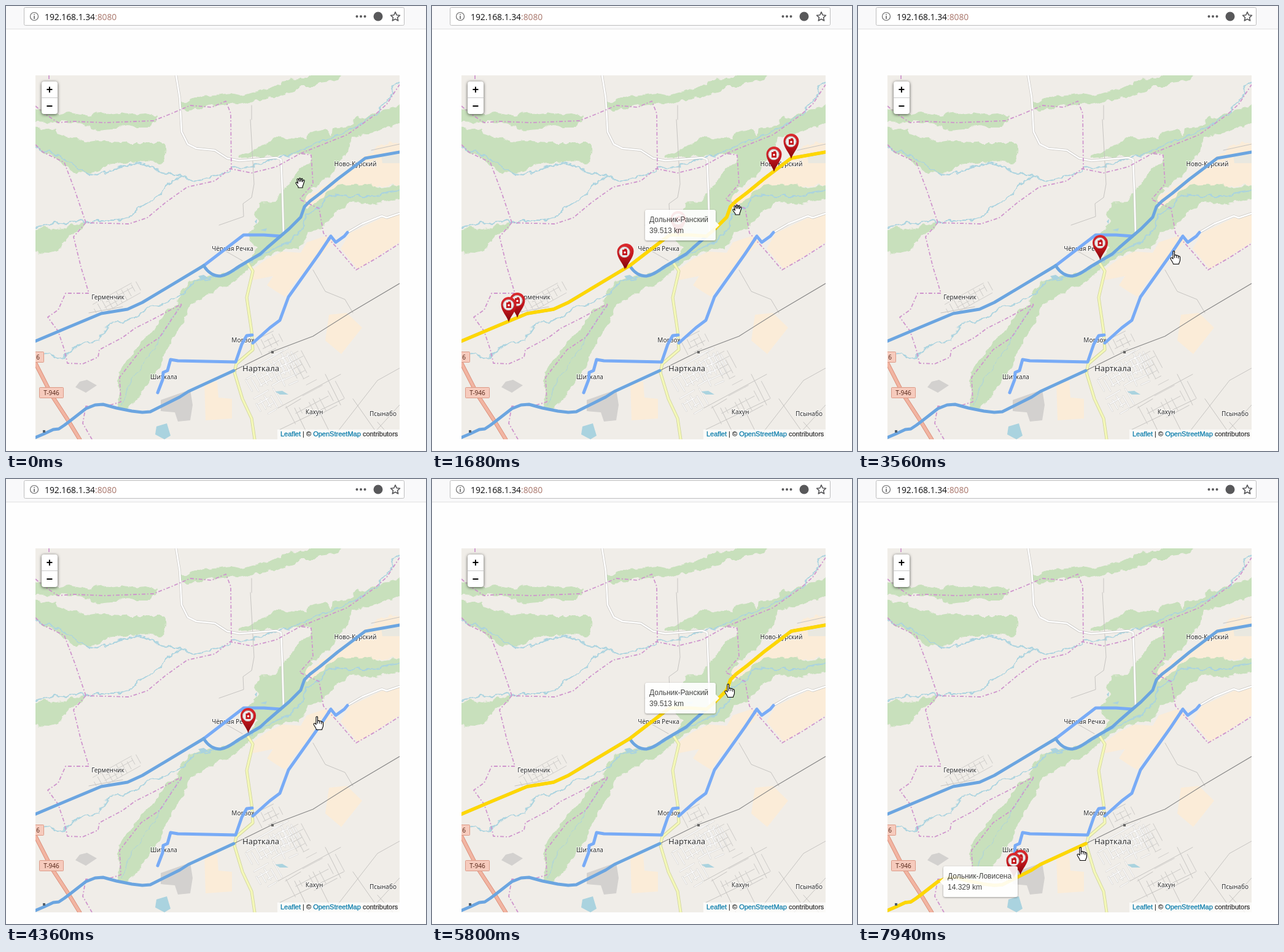
Write an HTML page that moves like this. It is 684 px wide and 725 px high and loops after 8000 ms.

```html
<!DOCTYPE html>
<html lang="ru">
<head>
<meta charset="utf-8">
<title>Road map</title>
<style>
html, body { margin: 0; width: 100%; height: 100%; overflow: hidden; background: #fefefe; }
svg { position: absolute; left: 0; top: 0; will-change: transform; }
path, line { fill: none; stroke-linejoin: round; stroke-linecap: round; }
.wood { fill: #c8e0bc; }
.farm { fill: #fbecd8; }
.town { fill: #d3d1cf; }
.water { fill: #aad3df; }
.river { stroke: #aad3df; stroke-width: 2; }
.border { stroke: #cf95cd; stroke-width: 1.8; stroke-dasharray: 6 3 2 3; stroke-linecap: butt; }
.thin { stroke: #c6c4c1; stroke-width: 1; }
.label { font: 10px "Noto Sans", "Open Sans", sans-serif; fill: #2b2b2b; text-anchor: middle;
  stroke: #fff; stroke-opacity: .7; stroke-width: 2; paint-order: stroke; }
.ref { font: 10px "Noto Sans", sans-serif; fill: #5a2a1c; text-anchor: middle; }
.road { stroke: #78abf6; stroke-width: 5; }
.dark { stroke: #6ba5e0; }
.hot { stroke: #ffd700; stroke-width: 5.5; }
.tip { opacity: .9; font: 12px "Liberation Sans", Arial, sans-serif; fill: #333; }
.tip rect, .tip path { fill: #fff; }
.tip rect { filter: drop-shadow(0 1px 1.5px rgba(0,0,0,.4)); }
.zoom { font: bold 18px "Liberation Mono", monospace; text-anchor: middle; }
.cursor path { fill: #fff; stroke: #000; stroke-width: 1.1; }
</style>
</head>
<body>
<svg width="684" height="725">
  <defs>
    <clipPath id="frame"><rect x="48" y="113" width="593" height="593"/></clipPath>
    <filter id="rough" filterUnits="userSpaceOnUse" x="30" y="100" width="630" height="620" color-interpolation-filters="sRGB">
      <feTurbulence type="fractalNoise" baseFrequency=".09" numOctaves="2" seed="4"/>
      <feDisplacementMap in="SourceGraphic" scale="10" xChannelSelector="R" yChannelSelector="G"/>
    </filter>
  </defs>

  <!-- browser bar -->
  <rect width="684" height="37.5" fill="#f9f9fa"/>
  <path d="M0,37.5H684" stroke="#e0e0e1"/>
  <rect x="29.5" y="2.5" width="619" height="29" rx="2" fill="#fff" stroke="#bdbdbe"/>
  <circle cx="46" cy="17" r="6.5" fill="none" stroke="#6a6a6b" stroke-width="1.2"/>
  <path d="M46,16.5V20.5M46,13.6V13.7" stroke="#6a6a6b" stroke-width="1.7"/>
  <text x="63" y="22.5" font-family="Open Sans, Noto Sans, sans-serif" font-size="13.8" fill="#0c0c0d">192.168.1.34<tspan fill="#a8756a">:8080</tspan></text>
  <g fill="#58585a"><circle cx="571.5" cy="17" r="2"/><circle cx="578" cy="17" r="2"/><circle cx="584.5" cy="17" r="2"/><circle cx="606" cy="17" r="7.5"/></g>
  <path d="M634,9.8 636.2,14.7 641.5,15.2 637.5,18.8 638.7,24 634,21.2 629.3,24 630.5,18.8 626.5,15.2 631.8,14.7Z" stroke="#58585a" stroke-width="1.6"/>

  <!-- base map -->
  <g clip-path="url(#frame)">
    <rect x="48" y="113" width="593" height="593" fill="#f0ede8"/>
    <g filter="url(#rough)">
      <path class="wood" d="M40,162 60,170 75,172 86,178 100,173 117,176 135,180 150,172 165,176 185,174 205,177 225,174 246,180 244,190 235,197 210,197 195,193 180,200 150,203 135,198 120,190 90,188 75,190 40,187Z"/>
      <path class="wood" d="M40,198 80,202 92,212 108,215 130,222 150,219 200,223 258,223 260,240 255,257 230,253 190,256 165,258 150,270 130,273 112,272 95,262 85,250 65,240 40,226Z"/>
      <path class="wood" d="M286,158 320,147 367,142 385,146 405,140 440,130 455,122 475,118 490,118 510,106 552,106 535,122 512,125 500,131 480,131 470,139 435,150 415,152 395,158 380,161 367,158 330,163 310,168 295,171 286,166Z"/>
      <path class="wood" d="M40,365 60,361 85,365 102,359 132,352 125,363 108,370 95,385 85,398 70,402 40,401Z"/>
      <path class="farm" d="M609,226 650,221 650,290 600,293 560,291 525,300 512,322 492,328 478,317 500,305 530,285 570,258Z"/>
      <path class="wood" d="M650,145 632,166 600,172 588,183 572,180 560,196 532,199 530,210 520,200 492,206 490,217 440,214 425,222 403,235 383,241 378,249 445,244 495,240 497,255 478,264 470,278 460,290 452,300 436,320 412,322 406,338 410,352 395,372 398,385 412,395 455,394 475,398 485,385 493,370 512,362 530,345 545,330 560,320 600,323 620,318 650,315 650,290 610,295 585,290 545,292 525,300 510,318 490,330 486,315 500,298 520,283 535,270 545,250 558,238 562,215 600,205 650,188Z"/>
      <path class="wood" d="M412,390 400,410 380,425 352,436 322,442 300,450 282,468 278,487 262,497 250,512 240,530 222,545 212,560 190,585 183,605 187,630 180,655 195,658 205,650 222,630 238,605 250,590 262,560 277,535 290,510 300,487 320,475 345,462 368,452 385,437 400,425 420,410 440,402 455,394Z"/>
      <path class="river" d="M40,228 75,240 90,245 115,262 130,273 150,275 190,262 215,255 235,260 250,270 290,278 310,284 340,277 360,270 370,263 400,262 440,248 480,237 500,225 530,215 555,205 580,190 600,178 610,165 625,150 630,130 650,122"/>
      <path class="river" d="M40,362 62,358 80,353 100,355 120,348 130,353 150,350 180,350 200,345 215,330 240,315 260,297 270,285 285,278"/>
      <path class="river" d="M40,568 62,566 75,567 80,573 95,571 105,560 115,553 130,548 150,545 160,530 170,515 195,513 215,503 235,490 255,487 275,475 290,468 305,450 340,442 370,433 400,415 430,398 460,385 480,365 490,340 510,330 520,312 540,308 560,310 600,310 625,303 650,300"/>
      <path class="river" stroke-opacity=".8" d="M190,650 200,615 222,585 250,545 265,515 285,490" style="stroke-width:1.2"/>
    </g>
    <path class="farm" d="M641,338V385L573,429 545,395 560,370 610,346ZM400,430 425,412 450,400 480,402 490,385 520,375 535,382 500,420 470,450 455,474 440,465 425,455 435,440 400,447ZM526,503 555,500 580,524 546,567 520,545ZM323,613 344,612 346,638 368,640 368,672 325,675Z"/>
    <path d="M611,243 641,237V256L613,256Z" style="fill:#e9e8e0"/>
    <path class="town" d="M252,642 300,625 304,650 300,675 280,677 275,662 252,660ZM113,621 120,612 132,609 148,618 130,630Z"/>
    <path class="water" d="M245,685 262,680 268,700 258,706 243,698ZM313,440 322,438 331,444 318,446ZM438,628 450,627 460,633 446,633ZM405,351 409,347 408,355ZM414,365 425,362 423,367Z"/>
    <path class="thin" d="M400,162V185M398,185 404,290 400,312 386,322 387,343 347,357M500,430 520,465 552,478 565,500M135,500 190,490M443,655 545,600M446,690 550,640M500,640 530,700M470,655 495,706M535,700 605,610 641,590M590,706 641,650M565,640 600,690M605,678 630,706M520,600 545,650M455,655 480,640M595,235 641,225M350,395 385,415"/>
    <g id="streets"></g>

    <path d="M277,113 283,150 286,205 296,225 310,232 340,235 360,248 380,252 440,247 448,250 450,300 452,372M556,369 580,355 612,342 620,345 641,338" stroke="#c9c7c4" stroke-width="4"/>
    <path d="M277,113 283,150 286,205 296,225 310,232 340,235 360,248 380,252 440,247 448,250 450,300 452,372M556,369 580,355 612,342 620,345 641,338" stroke="#fff" stroke-width="2.6"/>
    <path id="yellow" d="M393,418 402,432 392,475 400,530 402,560 375,583 372,597 385,640 400,672 405,706" stroke="#cfd29c" stroke-width="5"/>
    <use href="#yellow" style="display:none"/>
    <path d="M393,418 402,432 392,475 400,530 402,560 375,583 372,597 385,640 400,672 405,706" stroke="#f4f8b8" stroke-width="3.4"/>
    <path d="M48,582 75,635 103,678 120,706" stroke="#d98d78" stroke-width="6.5"/>
    <path d="M48,582 75,635 103,678 120,706" stroke="#f2b5a2" stroke-width="4.8"/>
    <path d="M641,452 560,500 500,538 434,563 371,594 297,628" stroke="#858585" stroke-width="1.1"/>
    <path class="border" d="M70,113V121M48,163 62,175 85,190 110,188 160,190 240,187 270,175 300,162 335,165 358,155 366,175 367,265"/>
    <path class="border" d="M48,226 60,238 95,255 112,300 130,353 200,355 230,345 260,320 295,295 340,285 365,265 400,272 440,262 480,240 497,243 500,290 478,315 510,330 517,370 540,395 570,430 605,410 641,387M480,240 555,210 600,178 620,160 641,128"/>
    <path class="border" d="M130,353 110,376 122,425 135,468 97,468 85,495 68,507 85,530 95,560 100,582 125,583 150,572 152,560 190,540 210,525 240,510 287,485 270,510 250,540 220,560 185,605 187,645 170,650 130,652 125,680 140,706"/>
    <rect x="432" y="562" width="4" height="4" fill="#666"/>

    <g fill="#f6cbbd" stroke="#dc9a87"><rect x="54.5" y="621.5" width="39" height="17" rx="1"/><rect x="40.5" y="563.5" width="21" height="17" rx="1"/></g>
    <text class="ref" x="74" y="634">Т-946</text>
    <text class="ref" x="52" y="576">6</text>
    <g class="label">
      <text x="569" y="261">Ново-Курский</text>
      <text x="369" y="399">Чёрная Речка</text>
      <text x="166" y="478">Герменчик</text>
      <text x="386" y="548">Морзох</text>
      <text x="257" y="608">Шитхала</text>
      <text x="415" y="595" font-size="13" style="font-size:13px">Нарткала</text>
      <text x="502" y="665">Кахун</text>
      <text x="614" y="668">Псынабо</text>
    </g>
  </g>
</svg>

<svg width="684" height="725">
  <defs>
    <linearGradient id="red" x2="0" y2="1"><stop offset="0" stop-color="#dc2a2e"/><stop offset=".5" stop-color="#bf151b"/><stop offset="1" stop-color="#7d060c"/></linearGradient>
    <g id="pin">
      <path d="M0,0C-3,-10 -12.5,-18 -12.5,-28.5A12.5,12.5 0 0 1 12.5,-28.5C12.5,-18 3,-10 0,0Z" style="fill:url(#red)"/>
      <circle cx="-.5" cy="-28" r="8.7" fill="#ececec" stroke="#b9a5a5" stroke-width="1"/>
      <path d="M-4,-32H-1V-33.5H3V-32L4,-31V-23H-4Z" style="fill:#c4191e"/>
      <circle cx="0" cy="-27.5" r="1.7" fill="#fff"/>
    </g>
  </defs>
  <g clip-path="url(#frame)">
    <g id="roads"></g>
    <rect x="60" y="691" width="4" height="4" fill="#50606f"/>
    <g id="pins"></g>
    <g id="tips"></g>
    <rect x="442" y="690" width="199" height="16" fill="#fff" fill-opacity=".7"/>
    <text x="447" y="701" font-family="Liberation Sans, Arial, sans-serif" font-size="11" fill="#333" stroke="#333" stroke-width=".25"><tspan fill="#0078a8" stroke="#0078a8">Leaflet</tspan> | © <tspan fill="#0078a8" stroke="#0078a8">OpenStreetMap</tspan> contributors</text>
    <g class="zoom">
      <rect x="58" y="123" width="26" height="53" rx="4" fill="#fff" style="filter:drop-shadow(0 1px 2.5px rgba(0,0,0,.65))"/>
      <path d="M58,149.5H84" stroke="#ccc"/>
      <text x="71" y="142">+</text>
      <text x="71" y="169">−</text>
    </g>
  </g>
  <g class="cursor" id="cursor">
    <path id="grab" d="M-3,8V6.5L-6.5,1.5C-8,-.5 -6,-1.5 -5,-.5L-3.5,1 -5,-5C-5,-7 -3,-7 -2.5,-5.5L-1.5,-2V-6.5C-1.5,-8 .7,-8 .7,-6.5L1,-2 2,-6C2.3,-7.5 4.3,-7 4,-5.5L3.5,-1.5 5,-4C6,-5 7.3,-4.5 7,-3L5,3.5 4,6V8Z"/>
    <path id="point" d="M-4,-10C-4,-11.3 -1.5,-11.3 -1.5,-10V-3.5C-.5,-5 1.5,-4.5 1.8,-3.2 2.5,-4.2 4.7,-3.8 4.8,-2.2 6,-3 7.5,-2.2 7.5,-.5V4C7.5,7 5.5,8 5.5,10.5H-3.5C-3.5,8 -7.5,4 -8,1.5 -8,-.5 -5.5,-.5 -4,2ZM-4,2V-10M-1.5,-3.5V0M1.8,-3.2V0M4.8,-2.2V1"/>
  </g>
</svg>

<script>
const LOOP = 8000;
const $ = id => document.getElementById(id);
const show = (el, on) => el.style.display = on ? '' : 'none';

function add(parent, html) {
  parent.insertAdjacentHTML('beforeend', html);
  return parent.lastElementChild;
}

// Seeded street grids
let seed = 7;
const rnd = () => (seed = seed * 16807 % 2147483647) / 2147483647;

function streets(x, y, angle, cols, rows, dx, dy, white) {
  const w = cols * dx, h = rows * dy;
  let d = '';
  for (let i = 0; i <= cols; i++) d += `M${i * dx},${rnd() * h * .4}V${h * (.6 + rnd() * .4)}`;
  for (let j = 0; j <= rows; j++) d += `M${rnd() * w * .4},${j * dy}H${w * (.6 + rnd() * .4)}`;
  const place = `transform="translate(${x} ${y}) rotate(${angle})"`;
  add($('streets'), `<path ${place} d="${d}" stroke="#cfcdca" stroke-width="${white ? 2.4 : 1}"/>`);
  if (white) add($('streets'), `<path ${place} d="${d}" stroke="#fff" stroke-width="1.4"/>`);
}
streets(405, 545, -27, 4, 3, 10, 9, false);
streets(385, 600, -30, 10, 4, 9, 10, true);
streets(425, 573, -24, 5, 5, 8, 11, true);
streets(403, 640, -30, 4, 3, 9, 11, true);
streets(480, 560, 62, 5, 3, 11, 9, false);
streets(140, 487, -29, 9, 3, 9, 7, false);
streets(455, 650, -28, 5, 2, 18, 20, false);

// Roads: parts, hover spans, tooltip box
const west = 'M48,546 100,524 155,501 198,494 222,483 322,423';
const mid = 'M322,423 387,373 420,373 447,375';
const east = 'M447,375 461,363 480,344 486,327 495,318 512,305 540,282 585,248 641,238';
const bypass = 'M322,423C330,436 340,440 349,440 362,438 370,430 380,424L414,404 425,394 447,375';
const field = 'M556,369 551,375 537,385 529,375 509,405 460,474 446,512 430,524 402,549';
const village = 'M247,630 255,609 256,597 263,594 268,576 280,578 374,580 384,551 392,537 401,536';
const south = 'M48,703 62,697 77,690 86,689 95,683 103,677 130,656 145,650 158,649 180,655 205,660 222,662 235,661 283,637 297,628 371,594';

for (const d of [mid, field, village]) add($('roads'), `<path class="road" d="${d}"/>`);
for (const d of [west, east, bypass, south]) add($('roads'), `<path class="road dark" d="${d}"/>`);

const roads = [
  { d: west + mid + east, on: [[640, 1710], [5400, 5960]], box: [347, 332, 115], text: ['Дольник-Ранский', '39.513 km'] },
  { d: bypass, on: [[2450, 3430]], box: [186, 396, 194], text: ['Объездная а/д с. Бурная Вязка', '4.127 km'] },
  { d: field, on: [[3590, 3700], [4400, 5100]], box: [238, 424, 234], text: ['Ловисена-Бугринский-Вельдоравский', '7.081 km'] },
  { d: south, on: [[6850, 9000]], box: [139, 631, 121], right: true, text: ['Дольник-Ловисена', '14.329 km'] }
];
for (const r of roads) {
  const [x, y, w] = r.box;
  const arrow = r.right ? `M${x},${y + 19}l-6,6 6,6Z` : `M${x + w},${y + 19}l6,6 -6,6Z`;
  r.line = add($('roads'), `<path class="hot" d="${r.d}"/>`);
  r.tip = add($('tips'), `<g class="tip"><rect x="${x}" y="${y}" width="${w}" height="50" rx="3"/><path d="${arrow}"/>
    <text x="${x + 7}" y="${y + 20}">${r.text[0]}</text><text x="${x + 7}" y="${y + 38}">${r.text[1]}</text></g>`);
}

const stations = [
  { on: [[1450, 3370], [5850, 7520]], at: [[585, 249], [557, 270], [401, 375], [316, 428], [314, 429], [139, 508], [125, 515]] },
  { on: [[3370, 4720]], at: [[394.5, 414]] },
  { on: [[7520, 9000]], at: [[264.5, 645], [254, 650]] }
];
for (const s of stations)
  s.el = add($('pins'), '<g>' + s.at.map(([x, y]) => `<use href="#pin" x="${x}" y="${y}"/>`).join('') + '</g>');

// Pointer track: time, x, y
const track = [
  [20, 479, 288], [190, 480, 296], [340, 480, 296], [840, 491, 320], [1070, 491, 320], [1170, 498, 321],
  [1410, 498, 321], [1680, 497, 332], [2190, 465, 380], [2220, 465, 381], [2790, 435, 401], [2940, 432, 389],
  [3080, 432, 389], [3170, 425, 388], [3330, 425, 388], [3560, 517, 410], [3790, 509, 397], [4100, 509, 397],
  [4150, 509, 398], [4360, 509, 398], [4470, 514, 404], [4990, 514, 404], [5080, 509, 372], [5670, 485, 345],
  [5800, 485, 345], [6390, 395, 575], [6580, 381, 585], [6660, 381, 588], [7110, 365, 611], [7930, 365, 611],
  [7940, 365, 611]
];

function cursorAt(t) {
  const i = track.findIndex(k => k[0] > t);
  if (i < 0) return track[track.length - 1].slice(1);
  if (i === 0) return track[0].slice(1);
  const [t0, x0, y0] = track[i - 1], [t1, x1, y1] = track[i];
  const p = (t - t0) / (t1 - t0);
  return [x0 + (x1 - x0) * p, y0 + (y1 - y0) * p].map(Math.round);
}

const active = (spans, t) => spans.some(([a, b]) => t >= a && t < b);

function draw(now) {
  const t = now % LOOP;
  for (const r of roads) {
    const on = active(r.on, t);
    show(r.line, on);
    show(r.tip, on);
  }
  for (const s of stations) show(s.el, active(s.on, t));
  // The hand changes a moment before the road reacts
  const over = roads.some(r => active(r.on, t + 40));
  show($('point'), over);
  show($('grab'), !over);
  $('cursor').setAttribute('transform', `translate(${cursorAt(t)})`);
}

const start = performance.now();
function tick() {
  draw(performance.now() - start);
  requestAnimationFrame(tick);
}
tick();
</script>
</body>
</html>
```
